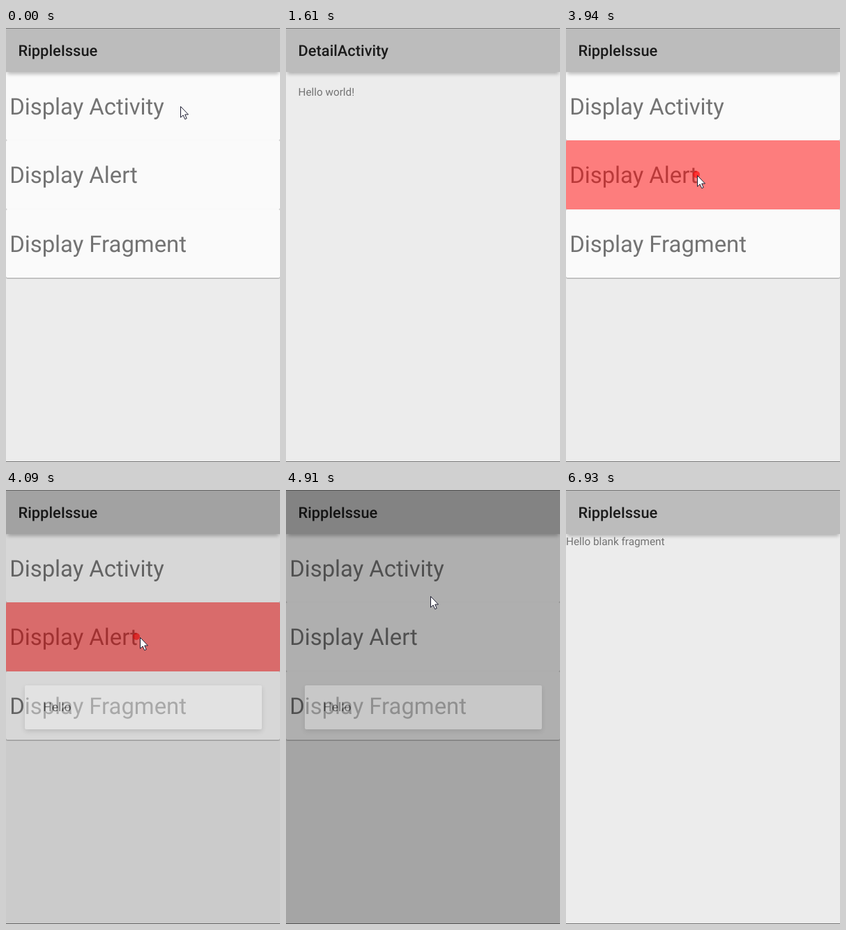
Write an HTML page that moves like this. It is 393x622 px and loops after 7510 ms.

```html
<!DOCTYPE html>
<html lang="en">
<head>
<meta charset="utf-8">
<title>Ripple demo</title>
<style>
  html, body { margin: 0; width: 100%; height: 100%; overflow: hidden; }
  #stage {
    position: relative; width: 393px; height: 622px; overflow: hidden;
    background: #ececec; color: #737373;
    font: 15.28px/18px Roboto, sans-serif; text-rendering: geometricPrecision;
  }
  #stage div { position: absolute; white-space: nowrap; box-sizing: border-box; }
  .page { inset: 0; }
  .bar {
    left: 0; top: 0; width: 393px; height: 63px; padding: 21px 0 0 17.6px;
    background: #bcbcbc; color: #1b1b1b; font-size: 21.83px; line-height: 26px; font-weight: 500;
    box-shadow: 0 5px 5px -2px rgba(0, 0, 0, .25);
  }
  .card {
    left: 0; width: 393px; height: 98.5px; padding: 31px 0 0 5.2px; overflow: hidden;
    background: #fafafa; border-radius: 2px; box-shadow: 0 1px 1.5px rgba(0, 0, 0, .35);
    font-size: 32.85px; line-height: 40px;
  }
  .glow { inset: 0; background: rgba(255, 0, 0, .5); }
  .spot { width: 10px; height: 10px; margin: -5px; border-radius: 50%; background: rgba(255, 0, 0, .6); }
  #detail { background: #ececec; }
  .edge { left: 0; width: 393px; height: 1px; background: #777; }
  #dim { inset: 0; background: #000; }
  #dialog {
    left: 27px; top: 280px; width: 340px; height: 63px; padding: 21px 0 0 26.2px;
    background: #eee; color: #202020; border-radius: 2px;
    font-size: 17.47px; line-height: 22px; box-shadow: 0 3px 7px rgba(0, 0, 0, .25);
  }
  #cursor { position: absolute; left: 0; top: 0; overflow: visible; }
</style>
</head>
<body>
<div id="stage">
  <div class="page">
    <div id="fragment" style="left:0;top:65px">Hello blank fragment</div>
    <div id="list" class="page"></div>
    <div class="bar">RippleIssue</div>
  </div>
  <div id="detail" class="page">
    <div style="left:17.6px;top:82.5px">Hello world!</div>
    <div class="bar">DetailActivity</div>
  </div>
  <div class="edge" style="top:0"></div>
  <div class="edge" style="top:621px"></div>
  <div id="dim"></div>
  <div id="dialog">Hello</div>
  <svg id="cursor" width="13" height="20">
    <path d="M.5 .5V16.2L4.1 12.9L6.7 18.7L9.2 17.6L6.7 12H11.5Z" fill="#fff" stroke="#1c1c30"/>
  </svg>
</div>
<script>
const LOOP = 7510, ROW = 98.5;
const $ = id => document.getElementById(id);
const fade = opacity => ({ opacity });
const slide = (opacity, y) => ({ opacity, transform: `translateY(${y}px)` });
const move = (x, y) => ({ transform: `translate(${x}px, ${y}px)` });

// A key is [ms, n, ...values]: go to the next key in n jumps (1 = hold, then jump).
function track(el, style, ...keys) {
  const frames = keys.map(([t, n, ...v]) => ({ offset: t / LOOP, easing: `steps(${n}, end)`, ...style(...v) }));
  frames.push({ ...frames.at(-1), offset: 1 });
  el.animate(frames, { duration: LOOP, iterations: Infinity });
}
const show = (el, from, to) => track(el, fade, [0, 1, 0], [from, 1, 1], [to, 1, 0]);

function add(parent, cls, x, y) {
  const el = document.createElement('div');
  el.className = cls;
  if (x !== undefined) el.style.left = x + 'px';
  if (y !== undefined) el.style.top = y + 'px';
  return parent.appendChild(el);
}

function addRow(i, label, pressX, down, up) {
  const card = add($('list'), 'card', 0, 62.5 + i * ROW);
  card.append(label);
  const glow = add(card, 'glow');
  add(glow, 'spot', pressX, ROW / 2);
  show(glow, down, up);
}
addRow(0, 'Display Activity', 248, 920, 1340);
addRow(1, 'Display Alert', 187, 3940, 4220);
addRow(2, 'Display Fragment', 157, 6030, 6150);

show($('fragment'), 6150, LOOP);
track($('list'), fade, [0, 1, 1], [6150, 1, 0]);
track($('detail'), slide, [0, 1, 0, 50], [1200, 2, .4, 20], [1460, 1, 1, 0], [2790, 1, 0, 50]);
track($('dim'), fade, [0, 1, 0], [4090, 2, .14], [4340, 1, .6], [4910, 1, .3], [5070, 1, 0]);
track($('dialog'), fade, [0, 1, 0], [4090, 2, .5], [4340, 1, 1], [4910, 1, .4], [5070, 1, 0]);

track($('cursor'), move,
  [0, 2, 250, 112], [240, 1, 248, 113],
  [1040, 3, 238, 203], [1460, 1, 184, 593], [1610, 1, -50, 593],
  [2790, 1, 188, 211], [4090, 2, 192, 211], [4340, 1, 203, 141], [4480, 1, 205, 137],
  [4910, 1, 207, 152], [5070, 3, 207, 152], [5490, 3, 165, 310], [5880, 1, 157, 329],
  [6030, 3, 157, 329], [6390, 2, 122, 414], [6660, 2, 195, 520], [6930, 1, 420, 590]);
</script>
</body>
</html>
```
